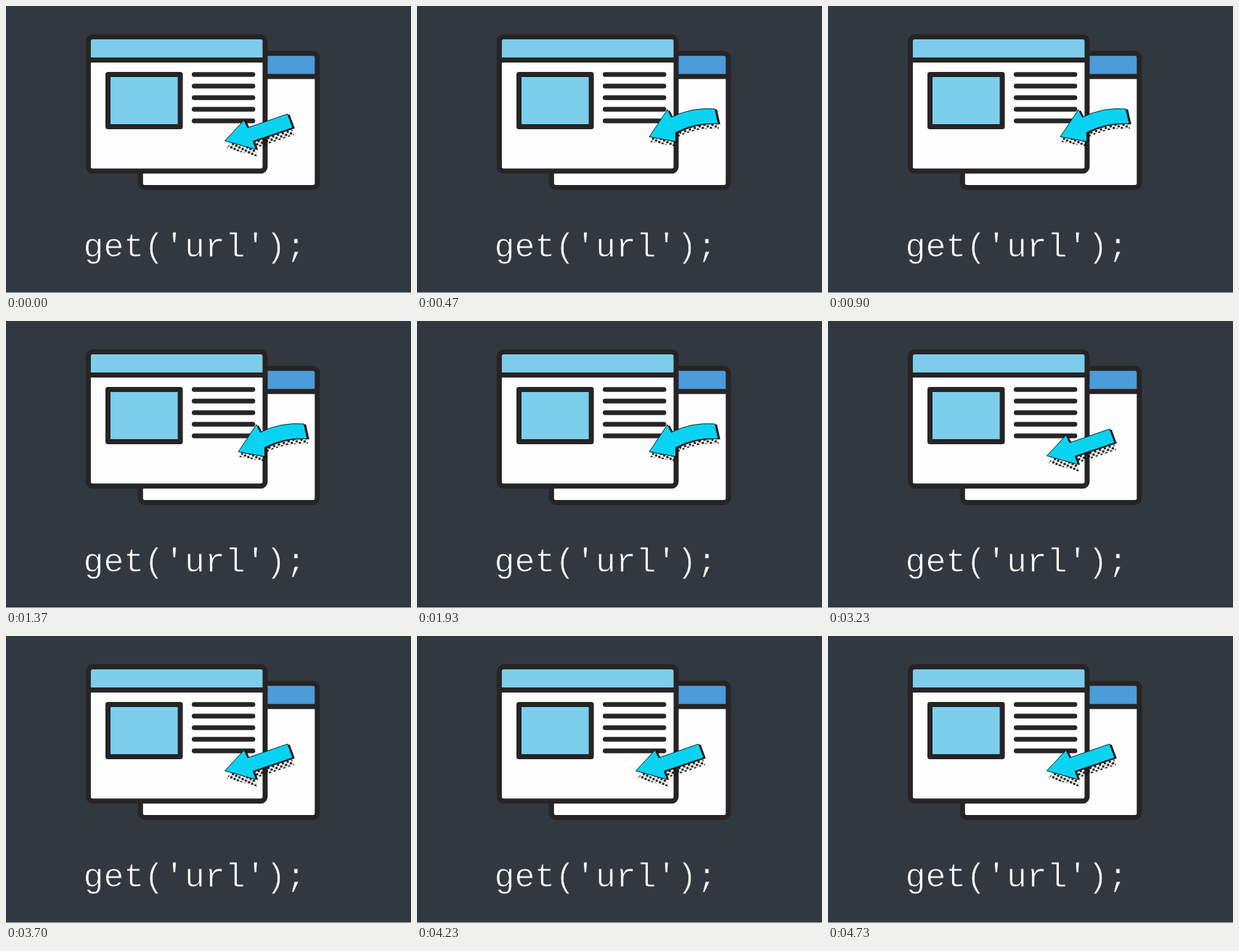
An HTML page that plays this animation: 558 by 396 pixels, repeating every 4.76 s.

```html
<!DOCTYPE html>
<html lang="en">
<head>
<meta charset="utf-8">
<title>get url</title>
<style>
  html, body { margin: 0; width: 100%; height: 100%; overflow: hidden; background: #323840; }
  svg { display: block; width: 558px; height: 396px; }
  .ink { fill: none; stroke: #272425; stroke-width: 7; stroke-linecap: round; stroke-linejoin: round; }
  .rules { stroke-width: 6.4; }
  .paper { fill: #fefefe; }
  /* The background-coloured stroke thins the letters. */
  .code { font: 46.5px "Liberation Mono", "Courier New", monospace; fill: #fff; stroke: #323840; stroke-width: .9; white-space: pre; }
  .face { fill: #08d3f3; stroke: #0a1418; stroke-width: .9; stroke-linejoin: round; }
  .edge { fill: #0a0d10; }
  .dots { fill: url(#halftone); }
</style>
</head>
<body>
<svg viewBox="0 0 558 396">
  <defs>
    <pattern id="halftone" width="7" height="7" patternUnits="userSpaceOnUse" patternTransform="rotate(-18)">
      <circle cx="1.75" cy="1.75" r="1.75" fill="#111"/>
      <circle cx="5.25" cy="5.25" r="1.75" fill="#111"/>
    </pattern>
    <g id="window">
      <rect class="paper" width="243.6" height="185.2" rx="6"/>
      <path d="M0 32V6Q0 0 6 0H237.6Q243.6 0 243.6 6V32Z"/>
      <rect class="ink" width="243.6" height="185.2" rx="6"/>
      <path class="ink" d="M0 32H243.6"/>
    </g>
    <path id="straightArrow" d="M301.5 186L328 157.5L333 168L388 149L395 168L340.5 186.5L344.5 198Z"/>
    <path id="curvedArrow" d="M320 180.5L345 143L350.5 153.5Q378 139.5 410.5 142L415 162.5Q384 160 356.5 174.5L356.5 187Z"/>
  </defs>

  <rect width="558" height="396" fill="#323840"/>
  <rect y="395" width="558" height="1" fill="#b4b8bd"/>

  <use href="#window" x="185.3" y="65.2" fill="#4b9cd9"/>
  <use href="#window" x="113.4" y="42.6" fill="#7dcdea"/>
  <rect class="ink" x="140.5" y="94.5" width="99.6" height="72" style="fill:#7bcfed"/>
  <path class="ink rules" d="M259.2 94.5h81m-81 16h81m-81 16h81m-81 16h81m-81 16h81"/>

  <g id="straight">
    <use class="dots" href="#straightArrow" x="2" y="10"/>
    <use class="edge" href="#straightArrow" x="2.8" y=".8"/>
    <use class="face" href="#straightArrow"/>
  </g>
  <g id="curved" visibility="hidden">
    <use class="dots" href="#curvedArrow" x="1" y="7"/>
    <use class="edge" href="#curvedArrow" x="2.8" y=".8"/>
    <use class="face" href="#curvedArrow"/>
  </g>

  <text class="code" x="106.5" y="345.8">get('url');</text>
</svg>
<script>
  const LOOP = 4760, BEAT = 500, BEND_AT = 268;
  const straight = document.getElementById('straight');
  const curved = document.getElementById('curved');

  function show(el, on) {
    el.setAttribute('visibility', on ? 'visible' : 'hidden');
  }

  // The arrow bends a little after the middle of every beat.
  function draw() {
    const bent = performance.now() % LOOP % BEAT >= BEND_AT;
    show(straight, !bent);
    show(curved, bent);
    requestAnimationFrame(draw);
  }
  draw();
</script>
</body>
</html>
```
